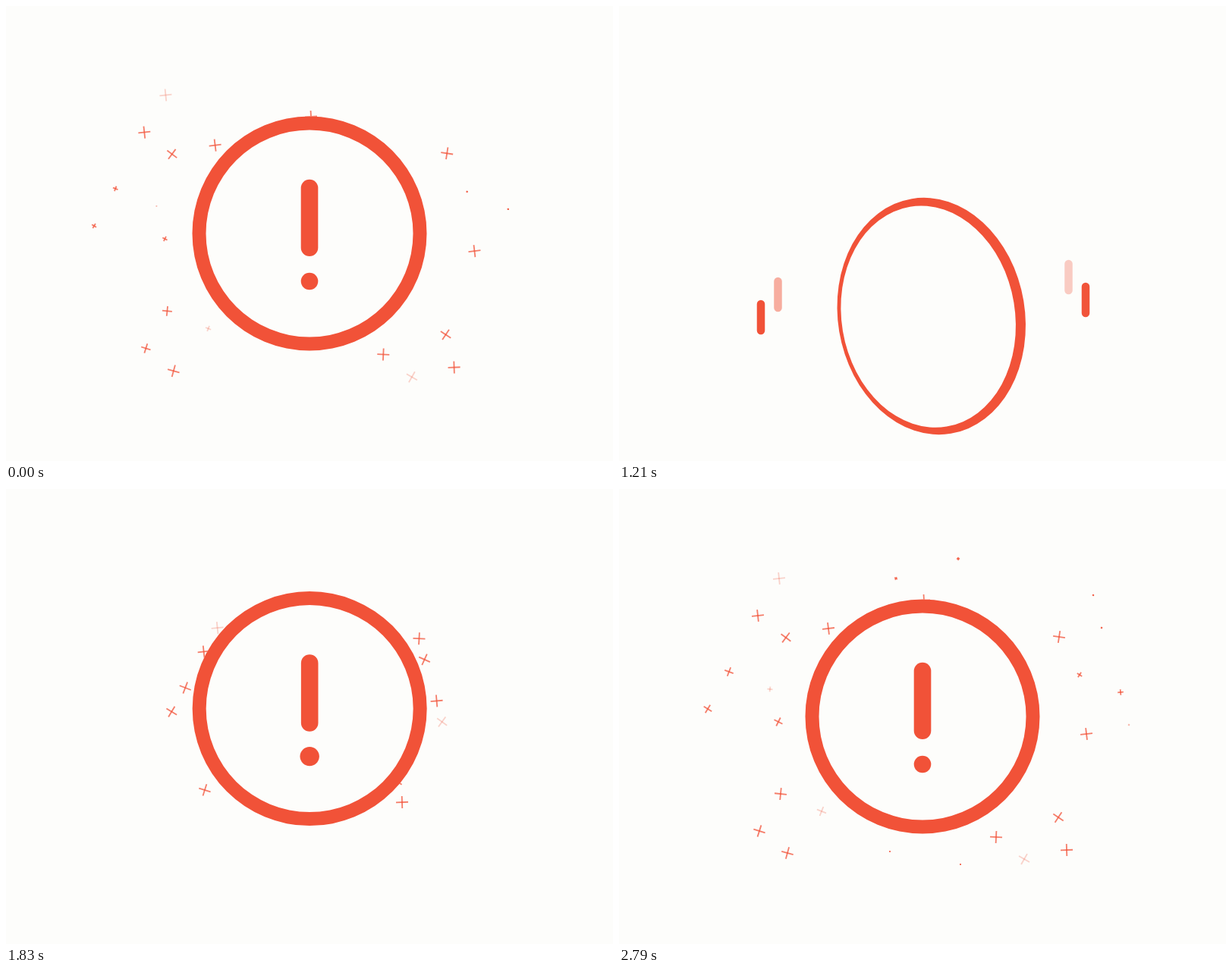
Write an HTML page with a canvas that moves like this. It is 800 by 600 pixels and loops after 2830 ms.

```html
<!DOCTYPE html>
<html lang="en">
<head>
<meta charset="utf-8">
<title>Alert</title>
<style>
  html, body { margin: 0; width: 100%; height: 100%; overflow: hidden; background: #fdfdfb; }
  canvas { display: block; }
</style>
</head>
<body>
<canvas id="stage" width="800" height="600"></canvas>
<script>
const ctx = document.getElementById('stage').getContext('2d');
const LOOP = 2830, ENTER = 1000;
const PAPER = '#fdfdfb', ORANGE = '#f15238';
const rad = deg => deg * Math.PI / 180;
const clamp = v => Math.max(0, Math.min(1, v));
const ramp = (t, from, to) => clamp((t - from) / (to - from));
const smooth = v => (1 - Math.cos(Math.PI * clamp(v))) / 2;

// Every burst is the same loose pentagon of sparks
const PENTAGON = [[-21, -44], [33, -21], [44, 22], [-12, 34], [-49, 5]];
const LATE = 3;
// Bursts around the middle, in order of vanishing: x, y, absent spark, pale spark
const BURSTS = [
  [6, 173, 3, 1], [192, -139, 0, 4], [14, -187, 0, 2], [228, -11, 4, 2],
  [-234, -15, 3, 1], [-166, 146, 2, 1], [146, 154, 0, 3], [-168, -138, 1, 0]
];

function line(x1, y1, x2, y2) {
  ctx.beginPath();
  ctx.moveTo(x1, y1);
  ctx.lineTo(x2, y2);
  ctx.stroke();
}

function cross(x, y, half, tilt) {
  ctx.save();
  ctx.translate(x, y);
  ctx.rotate(rad(tilt));
  line(-half, 0, half, 0);
  line(0, -half, 0, half);
  ctx.restore();
}

function sparks(t) {
  if (t < 1640) return;
  ctx.lineCap = 'butt';
  ctx.lineWidth = 1.8;
  ctx.strokeStyle = ORANGE;
  // Slowing flight: 0 at 2210 ms, 1 at 2790 ms
  const flight = (1 - Math.exp(-2.7 * (t - 2210) / 1000)) / 0.791;
  BURSTS.forEach(([bx, by, absent, pale], i) => PENTAGON.forEach(([px, py], j) => {
    if (j === absent) return;
    const late = j === LATE, faint = j === pale;
    const end = 2803 + 5 * i * i + (late ? 320 : faint ? -40 : 0);
    const half = 8 * clamp((end - t) / 120);
    const spread = 1 - (late ? 0.24 : 0.11) * (1 - flight);
    ctx.globalAlpha = faint ? 0.25 : 0.75;
    cross(400 + (bx + px) * spread, 300 + (by + py) * spread, half, 15 + 22 * Math.sin(7 * i + 3 * j));
  }));
  ctx.globalAlpha = 1;
}

// Upright streaks, two on each side of the rising ring
function streaks(t) {
  if (t > 1340) return;
  ctx.lineCap = 'round';
  ctx.lineWidth = 10.5;
  ctx.strokeStyle = ORANGE;
  for (const side of [-1, 1]) {
    for (const outer of [0, 1]) {
      const x = 401 + side * (191.5 + 22.5 * outer);
      const y = 369.5 - 11.5 * side + 30 * outer + (1210 - t) * 0.5;
      const end = 1249 - 9 * side + 70 * outer;
      ctx.globalAlpha = ramp(t, 1080, 1160) * clamp((end - t) / 100);
      line(x, y - 17.5, x, y + 17.5);
    }
  }
  ctx.globalAlpha = 1;
}

function rays(t) {
  if (t < 1345 || t > 1580) return;
  const outer = 165 + 66.5 * Math.pow(ramp(t, 1340, 1500), 0.75);
  const inner = 165 + 66.5 * Math.pow(ramp(t, 1340, 1580), 1.17);
  ctx.lineCap = 'round';
  ctx.lineWidth = 10.5 * clamp((1580 - t) / 70);
  ctx.strokeStyle = ORANGE;
  for (let deg = 30; deg < 360; deg += 60) {
    const c = Math.cos(rad(deg)), s = Math.sin(rad(deg));
    line(400 + inner * c, 300 + inner * s, 400 + outer * c, 300 + outer * s);
  }
}

// Rise from below, sink back to rest, then shake sideways
function center(t) {
  const sway = t < 1830 ? 0 : 6 * ramp(t, 2520, 2220);
  const x = 400 + sway * Math.sin(2 * Math.PI * (t - 1830) / 217);
  const y = t < 1600
    ? 262 + 534 * Math.pow((1600 - t) / 598, 3)
    : 262 + 40 * smooth((t - 1600) / 370) - 2 * smooth((t - 2210) / 190);
  return [x, y];
}

// A flat ring spinning about its upright axis, thicker on the near side
function ring(t, x, y) {
  const turn = t < 1640 ? Math.min(180, 70 * Math.pow((1640 - t) / 220, 1.056)) : 0;
  const c = Math.abs(Math.cos(rad(turn))), s = Math.sin(rad(turn));
  const w = 18 * ramp(t, 948, 1420);
  const ry = 154.5 + 2.5 * Math.min(1, 1.6 * s), rx = ry * c;
  const hole = Math.max(0, rx - w * Math.min(1, 0.3 + 0.75 * c));
  const shift = -0.85 * w * c * s;
  ctx.save();
  ctx.translate(x + 12 * (1 - Math.pow(1 - s, 4)), y);
  ctx.rotate(rad(-9.5 * Math.max(0, 1420 - t) / 210));
  ctx.beginPath();
  ctx.ellipse(0, 0, rx, ry, 0, 0, 2 * Math.PI);
  ctx.fillStyle = PAPER;
  if (t > 1600) ctx.fill();
  ctx.moveTo(shift + hole, 0);
  ctx.ellipse(shift, 0, hole, ry - w, 0, 0, 2 * Math.PI);
  ctx.fillStyle = ORANGE;
  ctx.fill('evenodd');
  ctx.restore();
}

function mark(t, x, y) {
  if (t > 1340) {
    const top = y - 60;
    ctx.lineCap = 'round';
    ctx.lineWidth = 22.6;
    ctx.strokeStyle = ORANGE;
    line(x, top, x, top + 0.1 + 78.7 * ramp(t, 1340, 1436));
  }
  const r = 14 * ramp(t, 1540, 1720) - 2.7 * ramp(t, 1720, 1950);
  ctx.beginPath();
  ctx.arc(x, y + 63, r, 0, 2 * Math.PI);
  ctx.fillStyle = ORANGE;
  ctx.fill();
}

function draw(now) {
  const clock = now % LOOP;
  const t = clock < ENTER ? clock + LOOP : clock;
  const [x, y] = center(t);
  ctx.fillStyle = PAPER;
  ctx.fillRect(0, 0, 800, 600);
  streaks(t);
  rays(t);
  sparks(t);
  ring(t, x, y);
  mark(t, x, y);
}

const start = performance.now();
function tick() {
  draw(performance.now() - start);
  requestAnimationFrame(tick);
}
tick();
</script>
</body>
</html>
```
